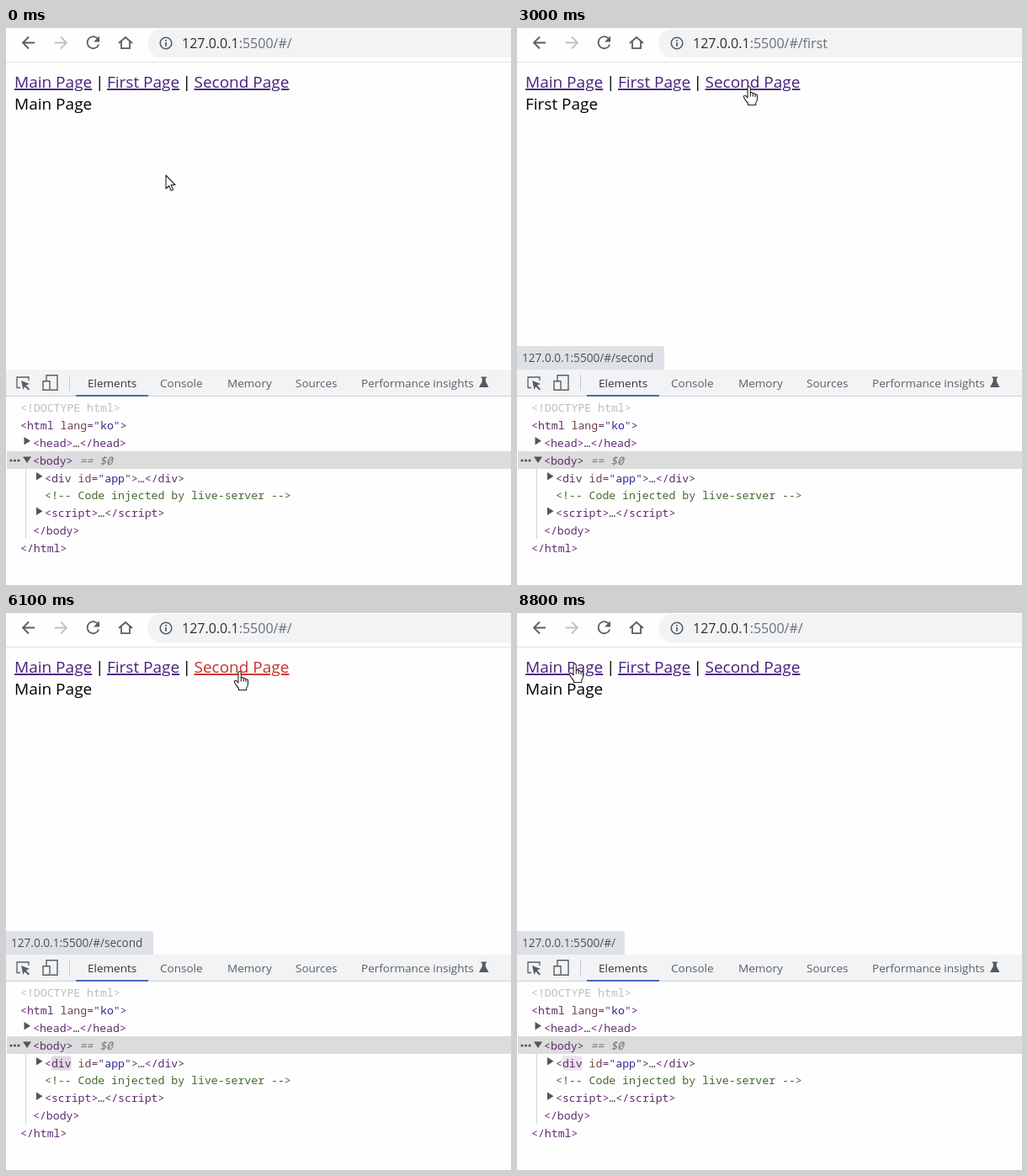
These frames come from a looping animation (600x662 px, 8.9 s). An HTML page:

```html
<!DOCTYPE html>
<html lang="en">
<head>
<meta charset="utf-8">
<title>Hash router demo</title>
<style>
  html, body { margin: 0; width: 100%; height: 100%; overflow: hidden; background: #fefefe; }
  svg { display: block; width: 600px; height: 662px; }
  text { font-family: "Open Sans", "Noto Sans", sans-serif; white-space: pre; }
  .page { font-size: 19px; }
  .link { fill: #47217c; text-decoration: underline; }
  .url { font-size: 16px; fill: #6b6f74; }
  .host { fill: #2c2e32; }
  .tip { font-size: 13.6px; fill: #4c5258; }
  .tab { font-size: 13.5px; fill: #5a5f65; }
  .code text { font: 13.2px "Noto Sans Mono", "DejaVu Sans Mono", monospace; fill: #602a70; }
  .code .doctype { fill: #bdbdbd; }
  .code .comment { fill: #42692f; }
  .code .dim { fill: #777; font-style: italic; }
  .name { fill: #70434a; }
  .value { fill: #2a2a90; }
  .dots { fill: #333; }
  .line { fill: none; stroke: #5a5e63; stroke-width: 1.8; }
  .pointer { fill: #fff; stroke: #222; stroke-width: 1.1; stroke-linejoin: round; }
</style>
</head>
<body>
<svg viewBox="0 0 600 662">
  <rect width="600" height="662" fill="#fefefe"/>

  <!-- Browser toolbar -->
  <rect x="168" y="1" width="460" height="34" rx="17" fill="#f1f3f4"/>
  <path d="M0 40.5H600" stroke="#dfe1e4"/>
  <path class="line" d="M34 17.5H20M27 10.5L20 17.5L27 24.5"/>
  <path class="line" d="M57.5 17.5H72M65 10.5L72 17.5L65 24.5" style="stroke:#bfc2c6"/>
  <path class="line" d="M109.2 13A7 7 0 1 0 110.2 19.5"/>
  <path d="M111 9.5V16.5H104Z" fill="#5a5e63"/>
  <path class="line" d="M134 18L142 11L150 18M137 16V24.2H147V16"/>
  <circle class="line" cx="190" cy="18" r="6.8" style="stroke-width:1.6"/>
  <path class="line" d="M190 17V21.8M190 14V15.7"/>
  <text class="url" x="209" y="24"><tspan class="host">127.0.0.1</tspan>:5500/#/<tspan id="route"></tspan></text>

  <!-- Page -->
  <g class="page">
    <text class="link" x="10" y="71">Main Page</text>
    <text x="106" y="71">|</text>
    <text class="link" x="120" y="71">First Page</text>
    <text x="209.5" y="71">|</text>
    <text class="link" x="223.5" y="71">Second Page</text>
    <text id="view" x="10" y="97"></text>
  </g>
  <g id="status">
    <path id="statusBox" fill="#dee1e6"/>
    <text id="statusText" class="tip" x="6" y="397"></text>
  </g>

  <!-- Inspector tabs -->
  <rect y="406" width="600" height="31" fill="#f1f3f4"/>
  <path d="M0 437.5H600" stroke="#cdd1d6"/>
  <path d="M83 437H169" stroke="#4a6ab5" stroke-width="2"/>
  <path d="M75.5 412V431" stroke="#c8cbd0"/>
  <path class="line" d="M17 427.5H13V415H27V419" style="stroke-width:1.3"/>
  <path d="M18 419L28 423L23.8 424.7L28 429L26.5 430.5L22.3 426.3L20.5 430Z" fill="#5a5e63"/>
  <path class="line" d="M48 419V412.7H61V430.3H53M44 419.7H52V430.3H44Z" style="stroke-width:1.4"/>
  <text class="tab" x="97" y="427" style="fill:#303338">Elements</text>
  <text class="tab" x="183" y="427">Console</text>
  <text class="tab" x="263" y="427">Memory</text>
  <text class="tab" x="344" y="427">Sources</text>
  <text class="tab" x="422" y="427">Performance insights</text>
  <path d="M564.5 414.5H571V416H569.8V420L573.5 427H562L565.7 420V416H564.5Z" fill="#555a60"/>

  <!-- Document tree -->
  <rect x="1" y="503" width="599" height="21" fill="#dcdcdd"/>
  <path d="M23.5 524V607" stroke="#c6d6df"/>
  <rect id="flash" x="54" y="526.5" width="23.5" height="17" rx="2.5" fill="#68386f"/>
  <g fill="#555">
    <circle cx="6" cy="514" r="1.6"/><circle cx="10.5" cy="514" r="1.6"/><circle cx="15" cy="514" r="1.6"/>
    <path d="M21.5 486V495.5L29 490.7ZM20 509.5H30L25 517ZM36 528V537.5L43.5 532.7ZM36 569.5V579L43.5 574.2Z"/>
  </g>
  <g class="code">
    <text class="doctype" x="17" y="456">&lt;!DOCTYPE html&gt;</text>
    <text x="17" y="477">&lt;html <tspan class="name">lang</tspan>="<tspan class="value">ko</tspan>"&gt;</text>
    <text x="32" y="497.5">&lt;head&gt;<tspan class="dots">…</tspan>&lt;/head&gt;</text>
    <text x="32" y="518.5">&lt;body&gt;<tspan class="dim"> == $0</tspan></text>
    <text x="46" y="539.5">&lt;div <tspan class="name">id</tspan>="<tspan class="value">app</tspan>"&gt;<tspan class="dots">…</tspan>&lt;/div&gt;</text>
    <text class="comment" x="46" y="560">&lt;!-- Code injected by live-server --&gt;</text>
    <text x="46" y="581">&lt;script&gt;<tspan class="dots">…</tspan>&lt;/script&gt;</text>
    <text x="32" y="601.5">&lt;/body&gt;</text>
    <text x="17" y="622.5">&lt;/html&gt;</text>
  </g>

  <!-- Pointers, hot spot at 0,0 -->
  <g id="pointer" class="pointer">
    <path id="arrow" d="M0 0V16L3.7 12.5L6.2 18.2L8.7 17.1L6.2 11.5H11Z"/>
    <path id="hand" d="M-2 13V2Q-1.8 .5 -.3 .5Q1.2 .5 1.3 2V8Q3.5 7 4.3 8.8Q6.3 8 7 9.8Q9.3 9.3 9.5 11.5V15.5Q9.3 18 7.7 20V22.5H-1.5V20.5Q-4.5 17.5-6.3 13.8Q-7.3 11.5-5.5 11.2Q-3.8 11-2 14ZM1.3 8V12.5M4.3 8.8V12.5M7 9.8V13"/>
    <path id="beam" d="M-3.5-7H-1L0-6L1-7H3.5M0-6V7M-3.5 8H-1L0 7L1 8H3.5" fill="none"/>
  </g>
</svg>
<script>
const LOOP = 8900, STEP = 100, FLASH = 1500, PRESS = 200;
const pages = [
  { title: "Main Page", route: "", left: 10, right: 102, tipWidth: 128 },
  { title: "First Page", route: "first", left: 120, right: 205, tipWidth: 152 },
  { title: "Second Page", route: "second", left: 223, right: 337, tipWidth: 175 },
];
// [time, page index]
const visits = [[-LOOP, 0], [1500, 1], [3800, 2], [4900, 0], [6300, 2], [7500, 0]];
const hovers = [[0, -1], [900, 1], [2600, 2], [4100, 0], [5700, 1], [5800, 2], [6600, 0]];
// [time, x, y]
const path = [
  [0, 190, 175], [250, 190, 175], [900, 168, 66], [1300, 168, 75], [2000, 168, 75],
  [2900, 276, 69], [3100, 276, 69], [3800, 275, 70], [4250, 62, 67], [4900, 62, 67],
  [5500, 116, 67], [5900, 278, 69], [6300, 278, 69], [6750, 69, 60], [LOOP, 69, 60],
];

const el = id => document.getElementById(id);
const links = document.querySelectorAll(".link");
const latest = (list, t) => list.filter(([time]) => time <= t).pop();

function pointerAt(t) {
  const next = path.findIndex(([time]) => time > t);
  const [t0, x0, y0] = path[next - 1], [t1, x1, y1] = path[next];
  const p = (t - t0) / (t1 - t0), eased = p * p * (3 - 2 * p);
  return [x0 + (x1 - x0) * eased, y0 + (y1 - y0) * eased];
}

function drawPointer(t) {
  const [x, y] = pointerAt(t);
  const onRow = y < 78;
  const onLink = onRow && pages.some(p => x >= p.left && x <= p.right);
  const shape = onLink ? "hand" : onRow ? "beam" : "arrow";
  for (const id of ["arrow", "hand", "beam"]) el(id).style.display = id === shape ? "" : "none";
  el("pointer").setAttribute("transform", `translate(${x.toFixed(1)} ${y.toFixed(1)})`);
}

function drawStatus(t) {
  const page = pages[latest(hovers, t)[1]];
  el("status").style.display = page ? "" : "none";
  if (!page) return;
  el("statusBox").setAttribute("d", `M0 378H${page.tipWidth - 4}q4 0 4 4V406H0Z`);
  el("statusText").textContent = "127.0.0.1:5500/#/" + page.route;
}

function draw(t) {
  const [since, index] = latest(visits, t);
  el("route").textContent = pages[index].route;
  el("view").textContent = pages[index].title;
  el("flash").setAttribute("opacity", Math.max(0, 1 - (t - since) / FLASH));

  const pressed = visits.find(([time]) => t >= time - PRESS && t < time);
  links.forEach((link, i) => link.style.fill = pressed && pressed[1] === i ? "#c9302c" : "");
  drawStatus(t);
  drawPointer(t);
}

const start = performance.now();
function frame() {
  const t = (performance.now() - start) % LOOP;
  draw(Math.floor(t / STEP) * STEP);
  requestAnimationFrame(frame);
}
frame();
</script>
</body>
</html>
```
